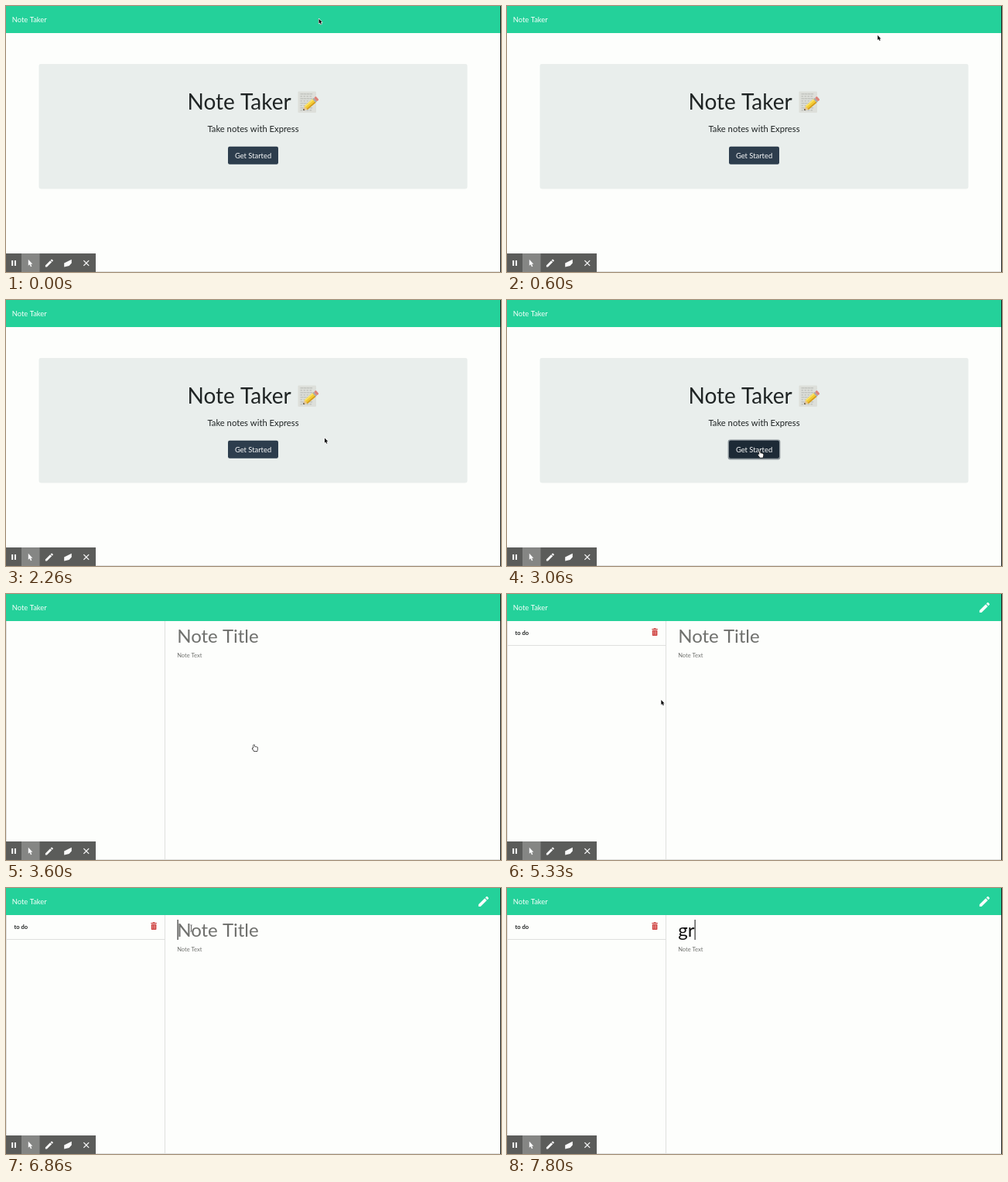
An HTML page with a canvas that plays this animation: 640x344 px, repeating every 8 s.

```html
<!DOCTYPE html>
<html lang="en">
<head>
<meta charset="utf-8">
<title>Note Taker</title>
<style>
  html, body { margin: 0; width: 100%; height: 100%; overflow: hidden; background: #fdfefc; }
  canvas { display: block; width: 640px; height: 344px; }
</style>
</head>
<body>
<canvas id="stage" width="640" height="344"></canvas>
<script>
const ctx = document.getElementById('stage').getContext('2d');
const LOOP = 8000;
const TICK = 1000 / 15;

const AT = { hover: 45, click: 46, notes: 54, list: 56, hide: 66, show: 70, type: 114, second: 117 };
const CARET = [[92, 96], [103, 110], [114, 121]];

// Pointer way points: tick, x, y
const WAY = [
  [0, 404.5, 16.5], [13, 501, 44], [17, 501, 44], [21, 491.5, 54], [23, 482, 62],
  [25, 482, 62], [37, 399, 200], [39, 399, 200], [42, 366, 205], [46, 327, 195.5],
  [69, 305, 194], [70, 299, 191], [76, 210, 143], [79, 210, 143], [80, 199.3, 137],
  [88, 254, 45], [90, 254, 45], [92, 239.5, 52]
];

const ARROW = new Path2D('M0 0V6.2L1.4 5L2.4 7.3L3.5 6.8L2.5 4.6H4.3Z');
const HAND = new Path2D('M1.8 5V.8Q2.4 0 3 .8V3Q3.9 2.5 4.3 3.2Q5.2 2.8 5.6 3.5Q6.6 3.2 6.9 4.2V6L6.2 8.5H2.8L.3 5.3Q.2 4.2 1 4.4Z');
const PENCIL = new Path2D('M3 17.3V21h3.7L17.8 9.9 14.1 6.2ZM20.7 7q.6-.7 0-1.4L18.4 3.3q-.7-.6-1.4 0L15.1 5.1l3.8 3.8Z');

function rect(x, y, w, h, color) {
  ctx.fillStyle = color;
  ctx.fillRect(x, y, w, h);
}

function round(x, y, w, h, r, color) {
  ctx.fillStyle = color;
  ctx.beginPath();
  ctx.roundRect(x, y, w, h, r);
  ctx.fill();
}

function text(str, x, y, size, color, weight = 400, align = 'left') {
  ctx.font = `${weight} ${size}px Lato, sans-serif`;
  ctx.textAlign = align;
  ctx.fillStyle = color;
  ctx.fillText(str, x, y);
}

function shape(path, x, y, scale, fill, line, width = 0.7) {
  ctx.save();
  ctx.translate(x, y);
  ctx.scale(scale, scale);
  if (line) {
    ctx.lineWidth = width;
    ctx.lineJoin = 'round';
    ctx.strokeStyle = line;
    ctx.stroke(path);
  }
  ctx.fillStyle = fill;
  ctx.fill(path);
  ctx.restore();
}

function poly(color, ...pts) {
  ctx.fillStyle = color;
  ctx.beginPath();
  for (let i = 0; i < pts.length; i += 2) ctx.lineTo(pts[i], pts[i + 1]);
  ctx.fill();
}

function pointer(tick) {
  let i = 0;
  while (i < WAY.length - 2 && WAY[i + 1][0] <= tick) i++;
  const [t0, x0, y0] = WAY[i];
  const [t1, x1, y1] = WAY[i + 1];
  const p = Math.min(1, (tick - t0) / (t1 - t0));
  const e = p * p * (3 - 2 * p);
  return [x0 + (x1 - x0) * e, y0 + (y1 - y0) * e];
}

function memo() {
  ctx.save();
  ctx.translate(377.5, 110.5);
  round(0, 0, 23.5, 27.5, 1, '#dddfda');
  for (let y = 3; y < 25; y += 3) {
    for (let x = 3; x < 19; x += 4) rect(x, y, 2.6 + (x * y) % 2, 0.8, '#a9aca8');
  }
  ctx.translate(6.5, 24.5);
  ctx.rotate(-0.71);
  poly('#e9c592', 0, 0, 5, -3, 5, 3);
  poly('#3d3a35', 0, 0, 2, -1.2, 2, 1.2);
  rect(5, -3.1, 14, 6.2, '#f3cb34');
  rect(5, -3.1, 14, 1.8, '#fae36b');
  rect(5, 1.4, 14, 1.7, '#d39a20');
  rect(19, -3.1, 2.2, 6.2, '#a8aaa9');
  round(21.2, -3.1, 3.4, 6.2, 1.4, '#dd8279');
  ctx.restore();
}

function home(tick) {
  round(42.5, 75, 554, 161.5, 2.4, '#e9eeec');
  text('Note Taker', 234.5, 134, 28, '#1f2424');
  memo();
  text('Take notes with Express', 319.5, 163, 11.25, '#1f2424', 400, 'center');
  if (tick >= AT.click) round(285.6, 180.4, 67.8, 26, 3, '#8c959a');
  round(287, 181.8, 65, 23, 2.2, tick >= AT.hover ? '#1d2a36' : '#2d3d4d');
  text('Get Started', 319.5, 196.6, 9.37, '#fbfcfc', 400, 'center');
}

function trash() {
  const red = '#cf4543';
  rect(187.3, 45, 7.6, 1.1, red);
  rect(189.7, 44.2, 2.8, 1, red);
  round(187.8, 46.7, 6.6, 7.3, 0.8, red);
  for (const x of [189.2, 190.8, 192.4]) rect(x, 47.8, 0.6, 5, '#eba9a6');
}

function notes(tick) {
  rect(0, 35, 1, 309, '#dfe0de');
  rect(205, 35, 1, 309, '#dfe0de');
  if (tick >= AT.list) {
    rect(0, 66, 205, 1, '#dfe0de');
    text('to do', 10.6, 53.3, 7.5, '#1f2222', 700);
    trash();
    shape(PENCIL, 608.7, 8.7, 0.73, '#fcfffd');
  }
  const typed = tick >= AT.second ? 'gr' : tick >= AT.type ? 'g' : '';
  text(typed || 'Note Title', 221.2, 62.6, 24, typed ? '#121212' : '#6f706d');
  const caretX = 221.5 + (typed ? ctx.measureText(typed).width : 0);
  text('Note Text', 221.2, 82, 7.5, '#6f706d');
  if (CARET.some(([a, b]) => tick >= a && tick < b)) {
    rect(Math.round(caretX) - 0.5, 41, 1.2, 26, '#333');
  }
}

function toolbar() {
  rect(0, 320, 116, 24, '#5b5c5a');
  rect(20, 320, 23.5, 24, '#858684');
  const white = '#fafafa';
  rect(7.2, 329, 2, 7, white);
  rect(11, 329, 2, 7, white);
  shape(ARROW, 28.8, 327.8, 1.3, white);
  shape(PENCIL, 49.2, 325.8, 0.56, white);
  poly(white, 75.2, 332.4, 84.8, 327.8, 84.8, 332.6, 81.6, 336, 75.2, 337.4);
  ctx.strokeStyle = white;
  ctx.lineWidth = 1.3;
  ctx.beginPath();
  for (const d of [-3.4, 3.4]) {
    ctx.moveTo(103.8 - d, 332.5 - 3.4);
    ctx.lineTo(103.8 + d, 332.5 + 3.4);
  }
  ctx.stroke();
}

function mouse(tick) {
  if (tick >= AT.type || (tick >= AT.hide && tick < AT.show)) return;
  const [x, y] = pointer(tick);
  if (tick >= AT.hover && tick < AT.hide) {
    shape(HAND, x - 2.6, y - 0.3, 1, '#fff', '#222', 1.3);
  } else if (tick > 85) {
    rect(x - 0.4, y - 4, 0.9, 8, '#555');
    rect(x - 1.5, y - 4.4, 3, 0.7, '#777');
    rect(x - 1.5, y + 3.8, 3, 0.7, '#777');
  } else {
    shape(ARROW, x, y, 1, '#111', '#fff', 1.1);
  }
}

function draw(ms) {
  const tick = Math.floor((ms + 7) / TICK);
  rect(0, 0, 640, 344, '#fdfefc');
  rect(0, 0, 640, 35, '#24d19a');
  text('Note Taker', 7.8, 20.8, 9.37, '#f7fffb');
  (tick < AT.notes ? home : notes)(tick);
  rect(0, 343, 640, 1, '#dfe0de');
  toolbar();
  rect(639, 0, 1, 344, '#1c1f1d');
  mouse(tick);
}

const start = performance.now();
function loop() {
  draw((performance.now() - start) % LOOP);
  requestAnimationFrame(loop);
}
loop();
</script>
</body>
</html>
```
